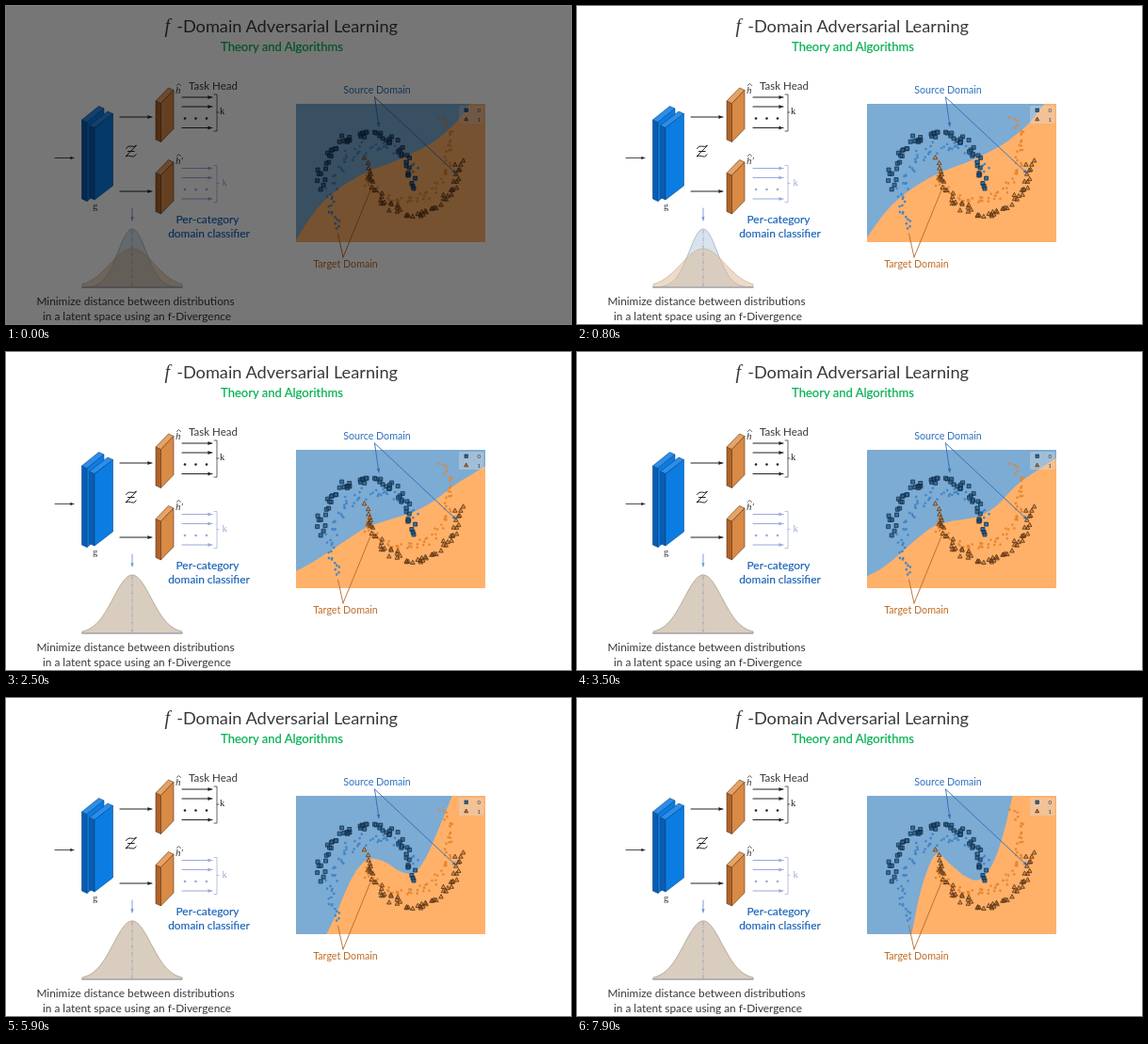
An HTML page for the animation above (8 s loop, 600 px wide and 338 px high).

```html
<!DOCTYPE html>
<html lang="en">
<head>
<meta charset="utf-8">
<title>f-Domain Adversarial Learning</title>
<style>
html, body { margin: 0; width: 100%; height: 100%; overflow: hidden; background: #fff; }
svg { display: block; width: 600px; height: 338px; }
text { font-family: Lato, "Open Sans", sans-serif; fill: #383838; }
.serif { font-family: "Liberation Serif", "Noto Serif", serif; }
.it { font-style: italic; }
.mid { text-anchor: middle; }
.line { fill: none; stroke-linecap: round; stroke-linejoin: round; }
</style>
</head>
<body>
<svg viewBox="0 0 600 338">
  <defs>
    <clipPath id="frame"><rect x="308" y="104" width="201" height="147"/></clipPath>
  </defs>
  <rect width="600" height="338" fill="#fff"/>

  <text class="serif it" x="168.500" y="28" font-size="20">f</text>
  <text x="416" y="28" font-size="18.200" text-anchor="end">-Domain Adversarial Learning</text>
  <text class="mid" x="293" y="47.500" font-size="13.050" style="fill:#00b050" stroke="#00b050" stroke-width=".2">Theory and Algorithms</text>

  <g id="net"></g>
  <path class="line" stroke="#222" stroke-width="1" d="M127.500 151.500q2-3.600 5.200-2.400q3.200 1.100 5.800-.9L127 160q3-1.900 5.700-.2q3.200 1.500 5.600-1.800M129.500 154.500h6.700"/>
  <text class="serif" x="92" y="215.500" font-size="10.500">g</text>
  <text class="serif it" x="180" y="93" font-size="11">h</text>
  <text class="serif it" x="180" y="168" font-size="11">h′</text>
  <path class="line" stroke="#333" stroke-width=".8" d="M181.500 84.500l2-2l2 2M181.500 159.500l2-2l2 2"/>
  <text class="mid" x="220" y="89" font-size="11.500">Task Head</text>
  <text class="mid" x="214" y="231" font-size="11.900" style="fill:#1762b8" stroke="#1762b8" stroke-width=".15">Per-category</text>
  <text class="mid" x="215.500" y="246" font-size="11.900" style="fill:#1762b8" stroke="#1762b8" stroke-width=".15">domain classifier</text>

  <path id="narrow" fill="#cfdcec" fill-opacity=".8" stroke="#93a5bd" stroke-width=".7"/>
  <path id="wide" fill="#dbb791" fill-opacity=".5" stroke="#c9b08e" stroke-width=".7"/>
  <path d="M80 299H187.500" stroke="#8f9bab" stroke-width=".9"/>
  <path d="M134 238V299" stroke="#8a97b0" stroke-width=".7" stroke-dasharray="4 1.500 1 1.500"/>
  <text class="mid" x="137.500" y="318" font-size="11.860">Minimize distance between distributions</text>
  <text class="mid" x="139" y="333.500" font-size="11.860">in a latent space using an f-Divergence</text>

  <g clip-path="url(#frame)">
    <rect x="308" y="104" width="201" height="147" fill="#ffb16a"/>
    <path id="region" fill="#7cabd4"/>
    <g id="points"></g>
  </g>
  <rect x="481" y="106" width="26.500" height="19" rx="1.500" fill="#ddd" fill-opacity=".4"/>
  <rect x="487" y="109" width="3.400" height="3.400" fill="#2a6496" stroke="#1b2c40" stroke-width=".7"/>
  <path d="M488.700 118l2 3.800h-4z" fill="#c8742c" stroke="#432a14" stroke-width=".7"/>
  <text x="500.500" y="113" font-size="6">0</text>
  <text x="500.500" y="122.500" font-size="6">1</text>

  <g id="pointers"></g>
  <text class="mid" x="394" y="93" font-size="10.700" style="fill:#2b70c0">Source Domain</text>
  <text class="mid" x="360.500" y="278" font-size="10.700" style="fill:#bf6c26">Target Domain</text>
  <rect id="shade" width="600" height="338" fill="#000"/>
</svg>
<script>
const LOOP = 8000;
const el = id => document.getElementById(id);
const mix = (a, b, u) => a + (b - a) * u;
const clamp = u => Math.min(1, Math.max(0, u));
const smooth = u => u * u * (3 - 2 * u);
const stroke = (d, color, w) => `<path class="line" d="${d}" stroke="${color}" stroke-width="${w}"/>`;

function arrow(x1, y1, x2, y2, color, w = .9, head = 4.5) {
  const a = Math.atan2(y2 - y1, x2 - x1);
  const corner = s => `${x2 - head * Math.cos(a + s)} ${y2 - head * Math.sin(a + s)}`;
  return stroke(`M${x1} ${y1}L${x2} ${y2}`, color, w) +
    `<path d="M${x2} ${y2}L${corner(.42)}L${corner(-.42)}z" fill="${color}"/>`;
}

// Upright plate: thin left side, thin top and a broad slanted face.
function slab(x, y, dx, dy, h, [face, side, top, edge]) {
  const part = (d, fill) =>
    `<path d="${d}" fill="${fill}" stroke="${edge}" stroke-width=".6" stroke-linejoin="round"/>`;
  return part(`M${x} ${y}l5.500 2.500v${h}l-5.500-2.500z`, side) +
    part(`M${x} ${y}l${dx} ${dy}l5.500 2.500l${-dx} ${-dy}z`, top) +
    part(`M${x + 5.5} ${y + 2.5}l${dx} ${dy}v${h}l${-dx} ${-dy}z`, face);
}

function outputs(y, color, xk) {
  const rows = [0, 10, 32.5].map(d => arrow(187, y + d, 219, y + d, color, 1.1, 5)).join("");
  const dots = [190, 201.5, 213]
    .map(x => `<circle cx="${x}" cy="${y + 22.5}" r="1.300" fill="${color}"/>`).join("");
  return rows + dots +
    stroke(`M221 ${y - 3}h3v39h-3M224 ${y + 16}h2`, color, .7) +
    `<text class="serif" x="${xk}" y="${y + 18}" font-size="10.500" style="fill:${color}">k</text>`;
}

const blue = ["#0b7ce2", "#0a5cb0", "#2c8ee8", "#0b4788"];
const orange = ["#d98a45", "#b0632a", "#e6a365", "#5c3414"];
el("net").innerHTML =
  slab(80.5, 121, 18, -14.5, 84, blue) + slab(88.5, 127, 19.5, -15, 76.5, blue) +
  slab(159, 101, 13.5, -14, 41, orange) + slab(159, 177.5, 13.5, -14, 41, orange) +
  arrow(52, 161.5, 72, 161.5, "#222", .8, 4) +
  arrow(121, 118, 155, 118, "#222", 1.1, 5) + arrow(121, 197, 155, 197, "#222", 1.1, 5) +
  outputs(97, "#222", 227) + outputs(172.5, "#9aa8dc", 229.5) +
  arrow(134, 215, 134, 228, "#6f93d2", .9, 4);

el("pointers").innerHTML =
  arrow(391.5, 97, 396, 128, "#2f6cb8") + arrow(391.5, 97, 478, 178, "#2f6cb8") +
  stroke("M358 267L352.500 242M358 267L386.500 197", "#b56a2c", .9);

// Two interleaved half moons; the second set is the first one turned by 32 degrees.
let seed = 7;
const rnd = () => (seed = seed * 16807 % 2147483647) / 2147483647;
const noise = s => (rnd() + rnd() + rnd() - 1.5) * 2 * s;

function moon(n, side, turn, mark) {
  const c = Math.cos(turn), q = Math.sin(turn);
  let d = "";
  for (let i = 0; i < n; i++) {
    const a = Math.PI * i / (n - 1);
    const x = side * (.51 + Math.cos(a)) + noise(.05);
    const y = side * (Math.sin(a) - .25) + noise(.05);
    d += `M${(408 + 48.5 * (x * c - y * q)).toFixed(1)} ${(178 + 57 * (x * q + y * c)).toFixed(1)}` + mark;
  }
  return d;
}
const cloud = (d, fill, edge, w) => `<path d="${d}" fill="${fill}" stroke="${edge}" stroke-width="${w}"/>`;
const dot = "m-1.200 0a1.200 1.200 0 1 0 2.400 0a1.200 1.200 0 1 0-2.400 0";
const turn = -32 * Math.PI / 180;
el("points").innerHTML =
  cloud(moon(70, -1, turn, dot), "#4384c4", "#4384c4", .2) +
  cloud(moon(70, 1, turn, dot), "#e6862f", "#e6862f", .2) +
  cloud(moon(60, -1, 0, "m-2-2h4v4h-4z"), "#33719f", "#17304a", .8) +
  cloud(moon(60, 1, 0, "m0-2.500l2.300 4.300h-4.600z"), "#dc8a43", "#5a3617", .8);

// Decision boundary: x,y pairs from the lower left to the upper right.
const times = [700, 1500, 3500, 4500, 5900, 7900];
const shapes = [
  [303,258, 317,234, 333,212, 355,193, 382,177, 402,169, 420,162, 450,147, 467,134, 482,119, 497,96],
  [300,232, 322,220, 344,209, 366,198, 386,188, 404,181, 422,173, 440,165, 462,154, 486,142, 515,127],
  [300,242, 322,231, 340,217, 358,201, 376,187, 392,181, 410,178, 428,174, 446,163, 470,139, 515,109],
  [319,258, 333,239, 347,220, 360,201, 373,186, 386,179, 402,179, 420,183, 438,180, 460,157, 494,96],
  [338,256, 350,231, 360,207, 371,185, 385,171, 402,174, 418,184, 432,186, 444,173, 457,145, 477,96],
  [354,256, 358,238, 363,213, 371,186, 382,166, 398,178, 413,190, 428,193, 441,177, 452,147, 464,98]
];

function boundary(t) {
  let i = 0;
  while (i < times.length - 2 && t > times[i + 1]) i++;
  const u = clamp((t - times[i]) / (times[i + 1] - times[i]));
  const p = shapes[i].map((v, j) => mix(v, shapes[i + 1][j], u));
  const last = p.length / 2 - 1;
  const at = (k, c) => p[2 * Math.min(last, Math.max(0, k)) + c];
  const handle = (k, s) => [0, 1].map(c => at(k, c) + s * (at(k + 1, c) - at(k - 1, c)) / 6).join(" ");
  let d = `M${p[0]} ${p[1]}`;
  for (let k = 0; k < last; k++)
    d += `C${handle(k, 1)} ${handle(k + 1, -1)} ${at(k + 1, 0)} ${at(k + 1, 1)}`;
  return d + "L515 90L300 90L300 260z";
}

function bell(height, sigma) {
  let d = "M81 299";
  for (let x = -53; x <= 53; x++)
    d += `L${134 + x} ${(299 - height * Math.exp(-x * x / (2 * sigma * sigma))).toFixed(2)}`;
  return d + "L187 299z";
}

function draw(now) {
  const t = now % LOOP;
  const merge = smooth(clamp((t - 800) / 1800));
  el("narrow").setAttribute("d", bell(62, mix(15, 20, merge)));
  el("wide").setAttribute("d", bell(mix(41, 62, merge), mix(23.5, 20, merge)));
  el("region").setAttribute("d", boundary(t));
  el("shade").setAttribute("opacity", .54 * clamp(1 - t / 320));
  requestAnimationFrame(draw);
}
draw(0);
</script>
</body>
</html>
```
